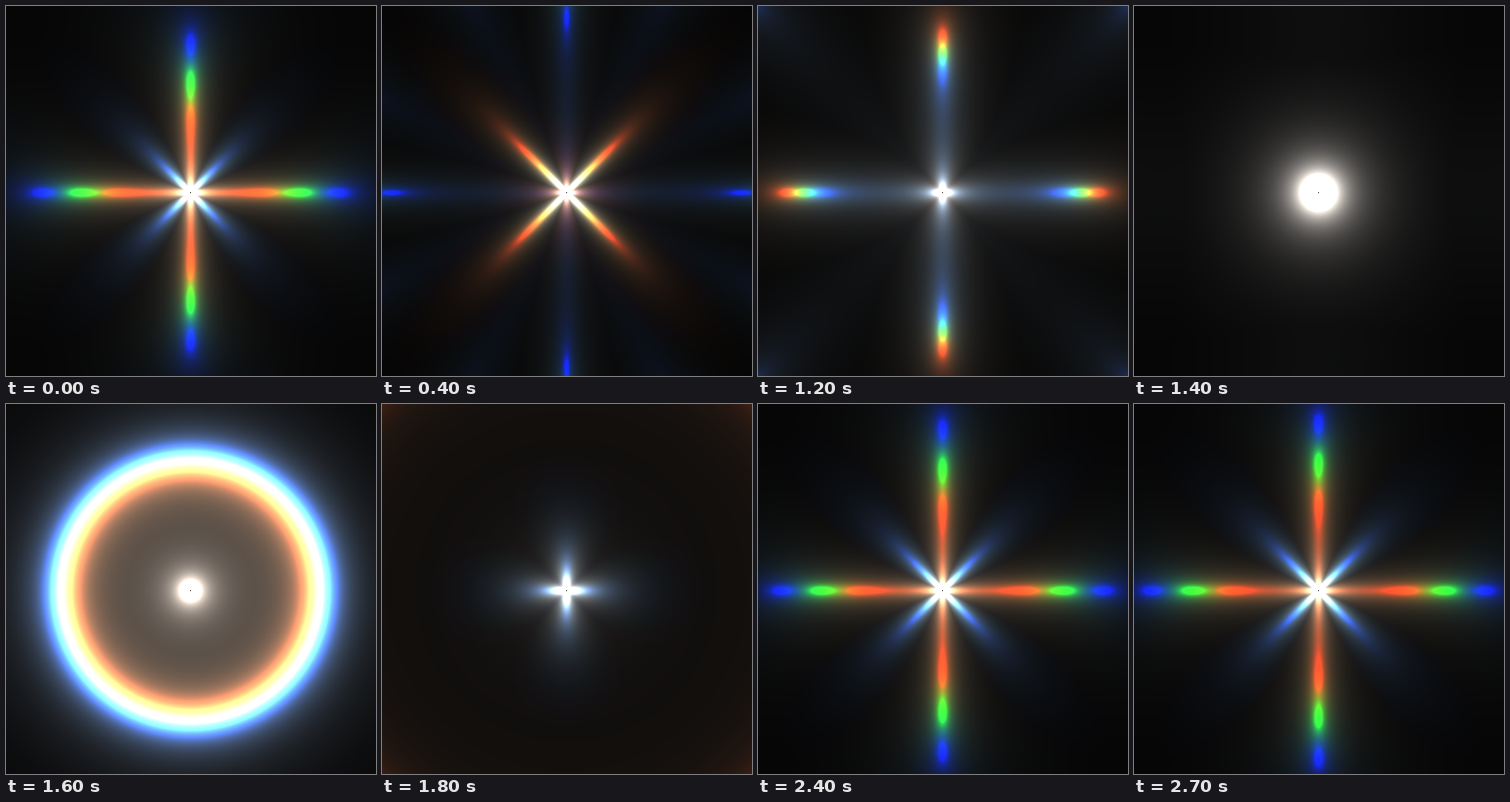
An HTML page with a canvas for the animation above (2800 ms loop, 446 by 445 pixels).

```html
<!DOCTYPE html>
<html>
<head>
<meta charset="utf-8">
<style>
  html, body { margin: 0; width: 100%; height: 100%; overflow: hidden; background: #000; }
  canvas { display: block; }
</style>
</head>
<body>
<canvas id="stage" width="446" height="445"></canvas>
<script>
const W = 446, H = 445, CX = 222, CY = 224, LOOP = 2800, STEP = 100;
const GLOW = 2.55;

// One skewed wave: how far the plane is pushed outwards at a few times.
const TIMES = [0, 400, 800, 1200, 1600, 2100, 2700];
const SHIFTS = [-1.295, 1.41, 1.295, 0.625, -0.352, -1.287, -1.342];
const N = TIMES.length;

const ctx = document.getElementById('stage').getContext('2d');
const image = ctx.createImageData(W, H);
const data = image.data.fill(255);

const wrap = i => (i + N) % N;
const span = i => (TIMES[wrap(i + 1)] - TIMES[wrap(i)] + LOOP) % LOOP;
const secant = i => (SHIFTS[wrap(i + 1)] - SHIFTS[wrap(i)]) / span(i);

// Harmonic mean of both sides, flat at a peak: the curve never overshoots.
function slope(i) {
  const a = secant(i - 1), b = secant(i);
  return a * b > 0 ? 2 * a * b / (a + b) : 0;
}

function shiftAt(time) {
  const i = TIMES.findLastIndex(t => t <= time), d = span(i);
  const k = (time - TIMES[i]) / d, j = 1 - k;
  return SHIFTS[i] * j * j * (1 + 2 * k) + SHIFTS[wrap(i + 1)] * k * k * (1 + 2 * j)
    + d * k * j * (slope(i) * j - slope(i + 1) * k);
}

const fold = v => v - Math.round(v);

// Each channel glows around lattice points after pushing the plane radially;
// the colours part further the larger the push is.
function draw(time) {
  const shift = shiftAt(time);
  const spread = 0.076 * shift * Math.abs(shift) ** 0.25;
  for (let py = 0, o = 0; py < H; py++) {
    const y = (py - CY) / H;
    for (let px = 0; px < W; px++, o += 4) {
      const x = (px - CX) / H;
      const r = Math.sqrt(x * x + y * y);
      for (let c = 0; c < 3; c++) {
        const scale = (r + shift + (c - 1) * spread) / r;
        const u = fold(x * scale), v = fold(y * scale);
        data[o + c] = GLOW / (r * Math.sqrt(u * u + v * v));
      }
    }
  }
  ctx.putImageData(image, 0, 0);
}

let start, shown = -1;
function tick(now) {
  start ??= now;
  const time = Math.floor((now - start) % LOOP / STEP) * STEP;
  if (time !== shown) draw(shown = time);
  requestAnimationFrame(tick);
}
requestAnimationFrame(tick);
</script>
</body>
</html>
```
